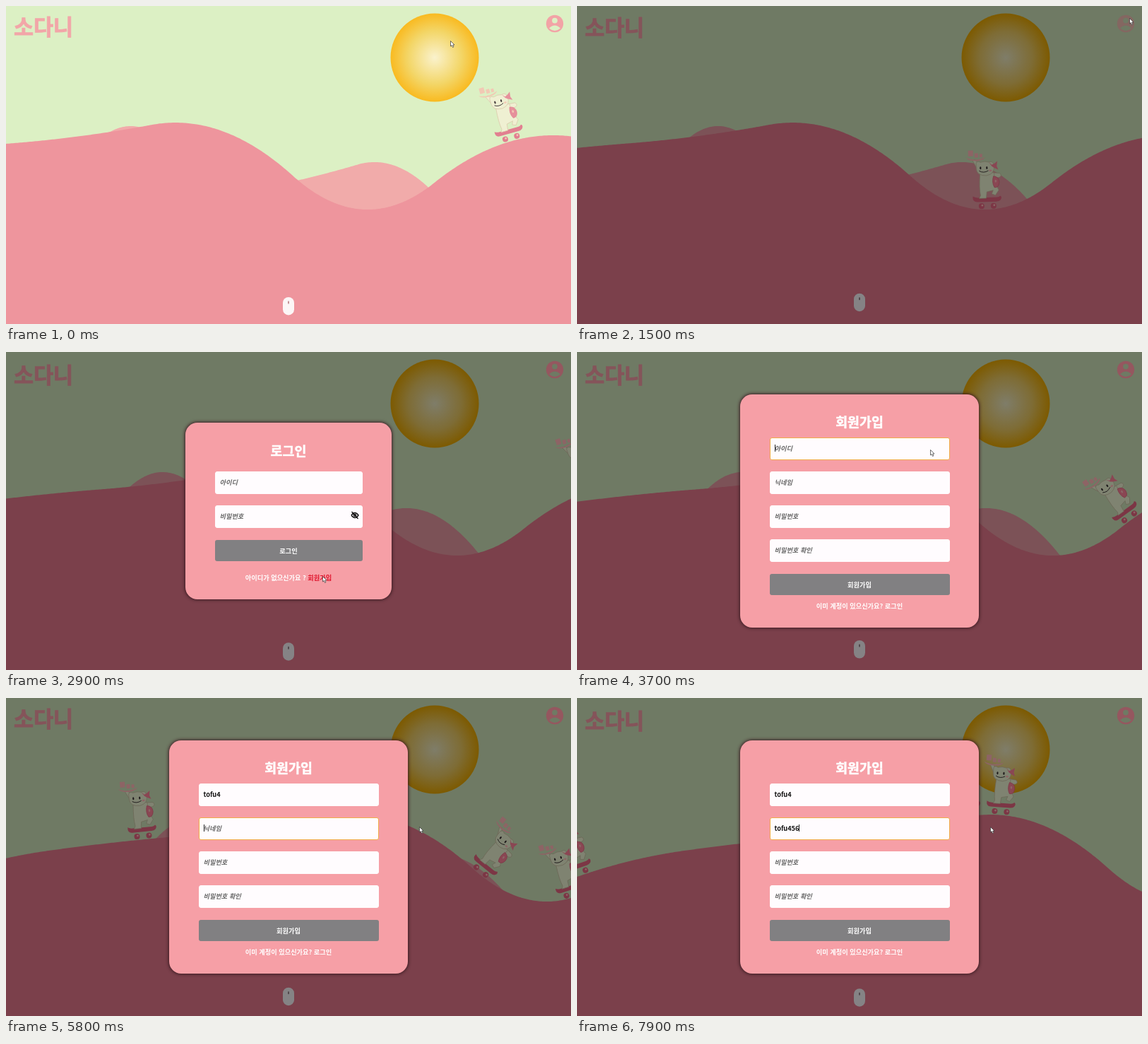
These frames come from a looping animation (800x450 px, 8000 ms). An HTML page with a canvas:

```html
<!DOCTYPE html>
<html lang="ko">
<head>
<meta charset="utf-8">
<style>
  html, body { margin: 0; width: 100%; height: 100%; overflow: hidden; }
  body { position: relative; font: 900 9.2px/1 "Noto Sans CJK KR", "Noto Sans CJK", sans-serif; color: #fff; }
  canvas, #cursor { position: absolute; left: 0; top: 0; }
  #logo { position: absolute; left: 11px; font-size: 30.5px; line-height: 30px; white-space: nowrap; -webkit-text-stroke: .8px; }
  .modal { position: absolute; box-sizing: border-box; border-radius: 17px; background: #f69fa6; box-shadow: 0 0 4px 1px #3c1c22; }
  .modal div { position: absolute; box-sizing: border-box; white-space: pre; }
  .title, .note { left: 0; width: 100%; text-align: center; }
  .title { font-size: 18.4px; line-height: 24px; -webkit-text-stroke: .5px; }
  .note { line-height: 14px; }
  .note b { color: #e0142c; }
  .field, .button { left: 41.5px; right: 41.5px; border-radius: 3px; }
  .field { height: 32px; line-height: 29px; padding-left: 6px; background: #fffcfe; border: 1.5px solid #fffcfe; color: #111; }
  .field.empty i { color: #696969; }
  .field.focus { border-color: #f0ae48; }
  .field u { display: inline-block; width: 1px; height: 10px; background: #222; vertical-align: -1px; margin-right: -1px; }
  .button { height: 30.5px; line-height: 30px; background: #818082; text-align: center; }
  .modal svg { position: absolute; }
</style>
</head>
<body>
<canvas width="800" height="450"></canvas>
<div id="logo">소다니</div>
<div class="modal" id="login" style="left:254px;top:100px;width:292px;height:250px">
  <div class="title" style="top:27px">로그인</div>
  <div class="field empty" style="top:68.5px"><i>아이디</i></div>
  <div class="field empty" style="top:117px"><i>비밀번호</i></div>
  <svg style="left:234px;top:125px" width="12" height="12" viewBox="0 0 12 12" fill="none" stroke="#111" stroke-width="1.3">
    <path d="M1 6Q6 -1 11 6Q6 13 1 6M1.5 1L10.5 11"/><circle cx="6" cy="6" r="1.6"/>
  </svg>
  <div class="button" style="top:165.5px">로그인</div>
  <div class="note" style="top:212px">아이디가 없으신가요 ? <b>회원가입</b></div>
</div>
<div class="modal" id="signup" style="left:231px;top:60px;width:338px;height:330px">
  <div class="title" style="top:26px">회원가입</div>
  <div class="field" style="top:60.5px"></div>
  <div class="field" style="top:108.7px"></div>
  <div class="field empty" style="top:157px"><i>비밀번호</i></div>
  <div class="field empty" style="top:205px"><i>비밀번호 확인</i></div>
  <div class="button" style="top:253.7px">회원가입</div>
  <div class="note" style="top:292px">이미 계정이 있으신가요? 로그인</div>
</div>
<svg id="cursor" width="8" height="11" viewBox="0 0 8 11">
  <path d="M.5 .5V8L2.2 6.5L3.5 9.5L4.9 8.9L3.7 6H6Z" fill="#fff" stroke="#333" stroke-width=".7"/>
</svg>
<script>
const LOOP = 8000, TAU = Math.PI * 2;
const $ = s => document.querySelector(s);
const ctx = $('canvas').getContext('2d');
const [idField, nickField] = document.querySelectorAll('#signup .field');

// Each colour: [normal, dimmed]
const COLORS = {
  sky: ['#dcf0c4', '#6f7a64'],
  back: ['#f1abaa', '#7c5257'],
  front: ['#ee959d', '#7b404b'],
  sunIn: ['#faf2cd', '#7f7d69'],
  sunMid: ['#f3d668', '#7e6c35'],
  sunOut: ['#f9ba20', '#7d5a00'],
  logo: ['#f2a6a8', '#85545a'],
  icon: ['#f2a3a6', '#95575f'],
  mouse: ['#fcf6f6', '#858385'],
  wheel: ['#b98085', '#4a4044'],
  body: ['#eff0d2', '#7f8371'],
  line: ['#dcc7ab', '#6c6656'],
  hat: ['#f2c9b4', '#8d6465'],
  pack: ['#e6909b', '#8a4653'],
  board: ['#e27f90', '#7c3645'],
  face: ['#403638', '#1c1819']
};
let dim = 0;
const col = name => COLORS[name][dim];

// Hills are quadratic curves through the midpoints of evenly spaced controls
const front = { start: -694, gap: 200, speed: .0437, color: 'front',
  ys: [300, 313.5, 230, 202.3, 186.7, 149.7, 330.5, 170.5, 200, 220] };
const back = { start: -235.7, gap: 133.33, speed: .0156, color: 'back',
  ys: [320, 300, 333, 128, 270, 244.2, 204.8, 383.5, 360, 340] };

function ground(hill, x, t) {
  const p = (x - hill.speed * t - hill.start) / hill.gap + .5;
  const k = Math.floor(p), s = p - k;
  const [a, b, c] = hill.ys.slice(k - 1, k + 2);
  const d0 = b - a, d1 = c - b;
  return { y: (a + b) / 2 + d0 * s + (d1 - d0) * s * s / 2, slope: (d0 + (d1 - d0) * s) / hill.gap };
}

function drawHill(hill, t) {
  ctx.beginPath();
  ctx.moveTo(0, 450);
  for (let x = 0; x <= 800; x += 2) ctx.lineTo(x, ground(hill, x, t).y);
  ctx.lineTo(800, 450);
  ctx.fillStyle = col(hill.color);
  ctx.fill();
}

function shape(color, path, stroke) {
  const p = new Path2D(path);
  ctx.fillStyle = col(color);
  ctx.fill(p);
  if (stroke) {
    ctx.strokeStyle = col(stroke);
    ctx.lineWidth = .7;
    ctx.stroke(p);
  }
}

function dot(color, x, y, rx, ry = rx) {
  ctx.beginPath();
  ctx.ellipse(x, y, rx, ry, 0, 0, TAU);
  ctx.fillStyle = col(color);
  ctx.fill();
}

function drawSkater(x, t) {
  if (x < -60 || x > 860) return;
  const g = ground(front, x, t);
  ctx.save();
  ctx.translate(x, g.y);
  ctx.rotate(Math.atan(g.slope));
  for (const wx of [-8, 9]) {
    dot('board', wx, -5, 4);
    dot('hat', wx + 1, -6, 1.4);
  }
  shape('board', 'M-20 -19Q-17 -17 -13 -17H14Q17 -17 19 -19Q22 -17 19 -13Q17 -11 13 -11H-14Q-21 -11 -20 -19Z');
  // raised arm, body and bent leg
  shape('body', 'M-9 -50L-19 -70L-15 -71L-3 -52Z', 'line');
  shape('body', 'M8 -52L19 -51Q23 -47 18 -45L9 -44Z', 'line');
  shape('body', 'M-9 -51Q-11 -30 -9 -20L-11 -16H-1L0 -25L9 -27L7 -22L12 -20L17 -27Q15 -33 12 -35L11 -52Z', 'line');
  shape('pack', 'M10 -47Q18 -46 18 -38Q17 -30 11 -31Q7 -38 10 -47Z', 'board');
  dot('hat', 13, -40, 1.3, 2);
  shape('body', 'M-14 -66Q-12 -70 -8 -67Q-2 -69 4 -67Q10 -69 11 -63Q13 -50 0 -48Q-14 -48 -14 -59Z', 'line');
  shape('pack', 'M4 -67L8 -63L12 -65L16 -68L15 -61L17 -56L11 -59L8 -61Z');
  dot('face', -8, -59, 1.1, 2);
  dot('face', 1, -59, 1.1, 2);
  dot('hat', 6, -55, 2, 1.3);
  ctx.strokeStyle = col('face');
  ctx.lineWidth = .9;
  ctx.beginPath();
  ctx.moveTo(-10, -55);
  ctx.quadraticCurveTo(-4, -51, 3, -55);
  ctx.stroke();
  shape('hat', 'M-28 -74Q-15 -68 -1 -74Q-3 -70 -12 -69Q-25 -69 -28 -74ZM-25 -84H-18V-76H-25ZM-16 -80H-11V-74H-16ZM-9 -79H-5V-74H-9Z');
  ctx.restore();
}

function drawScene(t) {
  ctx.fillStyle = col('sky');
  ctx.fillRect(0, 0, 800, 450);
  const sun = ctx.createRadialGradient(607, 73, 0, 607, 73, 62.5);
  sun.addColorStop(0, col('sunIn'));
  sun.addColorStop(.6, col('sunMid'));
  sun.addColorStop(1, col('sunOut'));
  ctx.fillStyle = sun;
  ctx.beginPath();
  ctx.arc(607, 73, 62.5, 0, TAU);
  ctx.fill();
  drawHill(back, t);
  drawHill(front, t);

  drawSkater(716 - .09 * t, t);
  drawSkater(603 + .055 * (7000 - t), t);
  drawSkater(599 + .097 * (7900 - t), t);

  // account button, faded while hovered
  ctx.globalAlpha = t >= 1200 && t < 1900 ? .55 : 1;
  dot('icon', 777, 25, 12.2);
  ctx.globalAlpha = 1;
  dot('sky', 777, 20.6, 3.9);
  shape('sky', 'M769 31.5Q777 23.5 785 31.5Q777 38.5 769 31.5Z');

  // scroll hint
  const y = 421.8 + 2.7 * Math.cos(TAU * (t / 1000 - .03));
  ctx.fillStyle = col('mouse');
  ctx.beginPath();
  ctx.roundRect(392, y - 12.5, 16, 25.5, 8);
  ctx.fill();
  dot('wheel', 400, y - 5, .9, 2.2);
}

// [time, x, y] of the pointer
const PATH = [[0, 629, 49], [400, 629, 49], [1300, 782, 17], [1800, 782, 17], [2700, 448, 317], [3100, 448, 317],
  [3500, 500, 138], [3800, 500, 138], [4200, 553, 183], [4900, 553, 183], [5200, 500, 186], [5400, 500, 186],
  [5700, 585, 182], [LOOP, 585, 182]];

function pointer(t) {
  const i = PATH.findIndex(p => p[0] > t);
  const [t0, x0, y0] = PATH[i - 1], [t1, x1, y1] = PATH[i];
  const s = (t - t0) / (t1 - t0), e = s * s * (3 - 2 * s);
  return [x0 + (x1 - x0) * e, y0 + (y1 - y0) * e];
}

function fillField(el, hint, text, focused, caret) {
  const bar = focused && caret ? '<u></u>' : '';
  el.className = 'field' + (text ? '' : ' empty') + (focused ? ' focus' : '');
  el.innerHTML = text ? text + bar : bar + `<i>${hint}</i>`;
}

const typed = (text, from, step, t) => text.slice(0, Math.max(0, Math.floor((t - from) / step) + 1));

function render(t) {
  dim = t >= 1400 ? 1 : 0;
  drawScene(t);
  const logo = $('#logo').style;
  logo.color = col('logo');
  logo.top = 14.5 - 1.6 * Math.cos(TAU * (t / 5000 - .12)) + 'px';

  $('#login').style.opacity = t < 3100 ? Math.min(1, Math.max(0, (t - 1500) / 200)) : 0;
  $('#signup').style.opacity = t >= 3100 ? 1 : 0;
  const onId = t >= 3600 && t < 5400, onNick = t >= 5400;
  const id = t < 4800 ? typed('tofu', 4000, 100, t) : 'tofu4';
  const nick = typed('tofu456', 7300, 100, t);
  const blink = from => (t - from) % 1000 < 500;
  fillField(idField, '아이디', id, onId, id ? blink(4000) : blink(3600));
  fillField(nickField, '닉네임', nick, onNick, nick || blink(5400));

  const [x, y] = pointer(t);
  $('#cursor').style.transform = `translate(${x}px,${y}px)`;
}

const begin = performance.now();
function tick() {
  const t = (performance.now() - begin) % LOOP;
  render(Math.floor(t / 100) * 100);
  requestAnimationFrame(tick);
}
tick();
</script>
</body>
</html>
```
